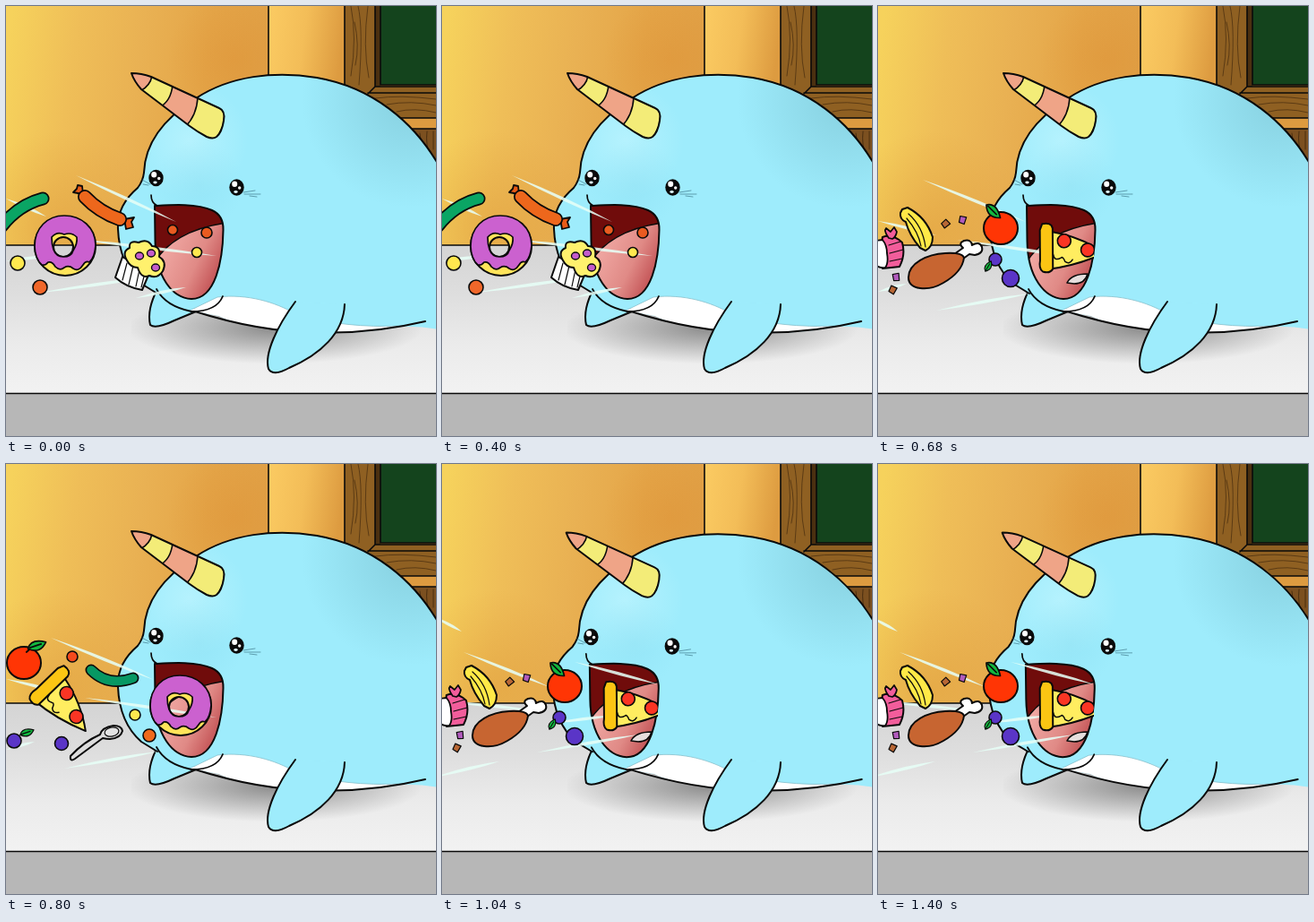
Write an HTML page with a canvas that moves like this. It is 480x480 px and loops after 1440 ms.

```html
<!DOCTYPE html>
<html>
<head>
<meta charset="utf-8">
<style>
html, body { margin: 0; width: 100%; height: 100%; overflow: hidden; }
canvas { display: block; width: 480px; height: 480px; }
</style>
</head>
<body>
<canvas id="stage" width="480" height="480"></canvas>
<script>
const ctx = document.getElementById('stage').getContext('2d');
const INK = '#0a0a0a';
const SKIN = '#9eecfc';
const TICK = 40, TICKS = 36;
ctx.lineCap = ctx.lineJoin = 'round';

function shape(d, fill, width = 2, color = INK) {
  const path = new Path2D(d);
  if (fill) { ctx.fillStyle = fill; ctx.fill(path, 'evenodd'); }
  if (width) { ctx.lineWidth = width; ctx.strokeStyle = color; ctx.stroke(path); }
}
function oval(x, y, rx, ry, fill, width = 1.6, angle = 0) {
  ctx.beginPath();
  ctx.ellipse(x, y, rx, ry, angle, 0, 7);
  ctx.fillStyle = fill;
  ctx.fill();
  if (width) { ctx.lineWidth = width; ctx.strokeStyle = INK; ctx.stroke(); }
}
const ball = (x, y, r, fill) => oval(x, y, r, r, fill);
function blend(x0, y0, x1, y1, ...colors) {
  const g = ctx.createLinearGradient(x0, y0, x1, y1);
  colors.forEach((c, i) => g.addColorStop(i / (colors.length - 1), c));
  return g;
}
function glow(x, y, r, rgb, alpha) {
  const g = ctx.createRadialGradient(x, y, 0, x, y, r);
  g.addColorStop(0, `rgba(${rgb},${alpha})`);
  g.addColorStop(1, `rgba(${rgb},0)`);
  return g;
}
function rect(x, y, w, h, fill) { ctx.fillStyle = fill; ctx.fillRect(x, y, w, h); }
function tube(d, fill, width) {
  shape(d, null, width);
  shape(d, null, width - 3.4, fill);
}
function at(x, y, angle, draw) {
  ctx.save();
  ctx.translate(x, y);
  ctx.rotate(angle);
  draw();
  ctx.restore();
}
function within(d, draw) {
  ctx.save();
  ctx.clip(new Path2D(d));
  draw();
  ctx.restore();
}

function room() {
  rect(0, 0, 294, 267, blend(0, 60, 294, 100, '#f6d25c', '#efbe58', '#e9b153', '#e4a548', '#e0a046'));
  rect(0, 0, 294, 267, glow(60, 250, 110, '218,146,50', .4));
  rect(0, 0, 294, 267, glow(255, 60, 75, '220,140,48', .35));
  rect(293, 0, 87, 130, blend(293, 0, 380, 12, '#fbcb62', '#f3bd58', '#dd9b40'));
  rect(378, 0, 102, 125, '#8f6022');
  rect(412, 0, 6, 90, '#4b3010');
  rect(418, 0, 62, 88, '#14441d');
  shape('M293 0V82M378 0V90M412 0V90L404 98M412 90H480M404 97H480M418 0V88H480', null, 1.6);
  shape('M385 0Q392 35 385 78M393 0Q399 25 394 88M404 0Q398 45 405 80M389 18Q395 44 390 66', null, .8, '#4e3111');
  shape('M412 103Q440 99 480 104M425 110Q452 105 480 111M436 118Q456 113 480 119', null, .8, '#4e3111');
  rect(438, 125, 42, 12, '#dd9b40');
  rect(448, 137, 32, 45, '#7c5020');
  shape('M438 125H480M448 137H480', null, 1.5);
  shape('M462 142L465 164M470 140Q468 155 474 170M477 140V160', null, .8, '#3e260c');
  rect(0, 267, 480, 166, blend(0, 267, 0, 433, '#d4d4d4', '#dedede', '#ebebeb', '#f2f2f2'));
  rect(0, 433, 480, 47, '#b7b7b7');
  shape('M0 267H160M0 432.5H480', null, 1.5);
  ctx.save();
  ctx.scale(1, .24);
  rect(140, 1350, 340, 450, glow(300, 1500, 165, '110,110,110', .75));
  ctx.restore();
}

function eye(x, y) {
  oval(x, y, 8.2, 9.3, INK, 0);
  oval(x - 2.3, y - 3.7, 3, 3.3, '#fff', 0);
  oval(x + 3.2, y + .5, 1.7, 1.8, '#fff', 0);
  oval(x - 1, y + 5, 2.2, 1.4, '#dff8ff', 0);
}

function horn() {
  const outline = 'M140 75Q151 75 162 79L238 114Q245 117 243 128Q241 141 235 146Q231 149 224 146Q213 140 205 134L151 93Q143 84 140 75Z';
  shape(outline, '#efa487', 0);
  within(outline, () => {
    shape('M163 78Q161 89 150 95L171 113Q184 107 186 88Z', '#f3ec78', 1.6);
    shape('M214 102Q213 122 200 135L234 152L250 116Z', '#f3ec78', 1.6);
  });
  shape(outline, null, 2);
}

function mouth() {
  const lips = 'M166 223C184 222 213 220 230 228Q243 234 242.5 250C242 284 234 327 207 327C186 326 167 303 166.5 262Z';
  shape(lips, '#700c0b', 0);
  within(lips, () =>
    shape('M161 295C175 264 204 248 246 242L247 340H160Z', blend(176, 275, 245, 308, '#efa6a1', '#e08a86', '#b94045'), 1.4));
  shape(lips, null, 2);
  shape('M162 211Q162 220 169 223', null, 1.7);
}

function whale(pose) {
  shape('M169 316Q157 339 161 356Q167 361 188 351Q205 344 217 339Z', SKIN);
  ctx.save();
  if (pose) {
    ctx.translate(360, 366);
    ctx.scale(1.006, .9945);
    ctx.translate(-360, -366);
  }
  const back = 'M482 176C455 130 410 91 347 80C300 72 250 78 212 103C174 127 155 155 154 186Q153 195 147 203C134 214 124 229 125 249C126 274 134 295 151 310L169 321';
  const body = back + 'Q190 342 211 341L238 346C252 354 295 364 345 364C390 366 415 363 440 358Q462 357 482 361Z';
  shape(body, SKIN, 0);
  within(body, () => {
    rect(120, 70, 360, 300, glow(205, 150, 65, '196,246,255', .6));
    rect(120, 70, 360, 300, glow(215, 200, 50, '120,208,230', .22));
    rect(120, 70, 360, 300, glow(450, 105, 120, '120,190,205', .6));
    shape('M205 340L236 325C270 321 301 331 322 343C355 355 405 359 438 357L430 370H240Z', '#fff', .7, '#80b8c5');
  });
  shape(back, null);
  shape('M468 352C430 361 390 366 345 364C295 364 252 354 211 341', null);
  shape('M168 316Q178 335 207 341Q235 341 242 324', null, 1.8);
  mouth();
  eye(167.5, 192);
  eye(257.5, 202.5);
  shape('M152 194L161 199M153 199L159 200M265 208L278 206M266 210L284 210M272 212L280 213', null, .7, '#407a8b');
  horn();
  ctx.restore();
  shape('M323 330C303 357 288 388 293 405Q298 414 316 404C351 389 377 365 378 333', SKIN);
}

function leaf(x, y, angle, size = 1) {
  at(x, y, angle, () => {
    ctx.scale(size, size);
    shape('M-9 3Q-6-8 10-4Q4 9-9 3ZM-7 2L5-2', '#12b83f', 1.6);
  });
}
function apple(x, y, leafX, angle) {
  oval(x, y, 19, 18, '#ff3505', 2);
  shape(`M${x + leafX / 5} ${y - 12}L${x + leafX * .6} ${y - 17}`, null, 1.8);
  leaf(x + leafX, y - 19, angle, 1.05);
}
function donut(x, y) {
  at(x, y, 0, () => {
    const hole = 'M9 1A11 11 0 1 1-13 1A11 11 0 1 1 9 1Z';
    shape('M34 0A34 33 0 1 1-34 0A34 33 0 1 1 34 0Z' + hole, '#ffe45a');
    shape('M34-1C34-21 18-34-1-34C-20-34-34-20-34 0C-34 8-31 17-26 21Q-22 22-19 18Q-14 17-11 23Q-6 28-1 24Q4 21 9 25Q15 29 20 21Q23 16 27 18Q33 13 34-1ZM9 5Q14-3 13-10Q7-16-1-13Q-9-17-15-10Q-15-2-13 4Q-10 12-2 12Q7 12 9 5Z', '#cb61cf', 1.7);
  });
}
function pizza(x, y, angle) {
  at(x, y, angle, () => {
    shape('M-17-24L-13 23Q18 17 49 0Q22-16-12-19Z', '#ffed60', 2);
    ball(3, -10, 7.5, '#fa3524');
    ball(30, -2, 7.5, '#fa3524');
    shape('M-8 6Q-6 14 1 9Q3 7 6 13Q11 16 14 10', null, 1.5);
    shape('M-23-27Q-13-30-11-23L-7 22Q-10 28-18 26Q-23 23-22 14L-25-20Z', '#fbc513', 2);
  });
}

function muffin() {
  shape('M130 280L122 303Q134 314 152 317L160 298Z', '#fff', 2);
  shape('M135 287L130 306M142 290L137 311M149 294L145 313M155 298L151 314', null, 1.2);
  shape('M135 284Q129 274 138 270Q137 261 148 264Q158 259 163 268Q173 268 171 280Q180 285 175 296Q169 305 160 301Q151 305 147 292Q139 292 135 284Z', '#fff16d');
  for (const [x, y] of [[149, 279], [162, 276], [167, 292]]) oval(x, y, 4.5, 4, '#c45ccb', 1.4);
}

function firstFoods() {
  tube('M-5 246Q14 222 41 215', '#0aa564', 15);
  donut(66, 268);
  shape('M86 210L75 208L79 204L80 200L85 201Z', '#e95b17', 1.8);
  shape('M132 238L143 236L140 241L142 247L134 249Z', '#e95b17', 1.8);
  tube('M88 213Q104 230 127 238', '#ed671c', 16);
  muffin();
  ball(13, 287, 8, '#ffe84f');
  ball(38, 314, 8, '#f0672a');
  ball(186, 250, 5.5, '#e95b20');
  ball(224, 253, 6, '#e95b20');
  ball(213, 275, 5.5, '#ffe84f');
}

function secondFoods() {
  apple(20, 222, 14, 0);
  pizza(58, 260, .89);
  ball(74, 215, 6, '#f44a1d');
  tube('M95 230Q114 249 142 239', '#079863', 13);
  shape('M105 302Q107 294 120 292Q129 292 130 298Q128 306 116 307Q112 307 108 306L77 329Q71 333 72 326Q87 310 105 302Z', '#dcdcdc');
  oval(118, 299, 8, 5, '#e4e4e4', 1.2, -.2);
  ball(9, 309, 8, '#5a35c7');
  leaf(23, 300, 0, .8);
  ball(62, 312, 7.5, '#5a35c7');
  donut(195, 270);
  ball(144, 280, 6, '#ffe84f');
  ball(160, 303, 7, '#f06a1d');
}

function crumb(x, y, fill, angle) {
  at(x, y, angle, () => shape('M-3-4L4-4L3 4L-3 3Z', fill, 1.2));
}
function thirdFoods() {
  within('M0 0H241V480H0Z', () => pizza(204, 272, .08));
  shape('M211 309Q216 299 234 299Q231 310 219 310Z', '#e6dedd', 1.6);
  apple(137, 248, -9, 1.1);
  ball(131, 283, 7, '#5a35c7');
  ball(148, 304, 9.5, '#5a35c7');
  leaf(123, 291, -.7, .65);
  shape('M27 227L33 225Q54 236 61 258Q61 269 53 273L47 270Q35 256 31 241Q24 238 25 231Z', '#ffe947', 2);
  shape('M34 232Q50 246 53 269M32 237Q45 252 48 268', null, 1.2);
  shape('M85 277L95 270Q89 265 96 262Q104 260 105 267Q113 262 116 269Q118 276 108 278L102 277L91 285Z', '#fff');
  shape('M34 303C34 287 55 277 75 276Q94 275 96 281Q94 297 73 309C56 319 34 317 34 303Z', '#c76531');
  shape('M5 258Q16 254 27 264Q31 278 24 291L5 293Q1 278 5 258Z', '#f25d9b');
  shape('M5 261Q10 267 10 276Q12 287 8 292Q0 293-3 288V262Z', '#fff', 1.8);
  shape('M12 259Q6 251 9 248L14 252L18 247L21 252Q20 258 16 260Z', '#f25d9b', 1.7);
  shape('M12 267L25 263M13 276L28 272M13 285L27 282', null, 1.1);
  crumb(75, 243, '#b86735', .8);
  crumb(94, 239, '#b15bbc', .2);
  crumb(20, 303, '#b15bbc', -.2);
  crumb(16, 317, '#b86735', .4);
}

// Each streak runs from one tip to the other: x0, y0, x1, y1.
const streaks = {
  long: [[78, 189, 190, 241], [0, 215, 45, 235], [74, 260, 235, 279], [0, 285, 48, 279], [38, 320, 160, 303], [145, 326, 201, 314]],
  left: [[50, 194, 165, 241], [0, 240, 65, 256], [88, 261, 235, 283], [0, 319, 32, 310], [65, 340, 170, 321]],
  low: [[-8, 171, 22, 187], [24, 210, 120, 249], [148, 221, 241, 246], [-5, 264, 110, 276], [125, 289, 190, 281], [106, 322, 220, 302], [-10, 350, 64, 332]],
};
function streak([x0, y0, x1, y1]) {
  const length = Math.hypot(x1 - x0, y1 - y0);
  at(x0, y0, Math.atan2(y1 - y0, x1 - x0), () =>
    shape(`M0 0Q${length * .55}-4 ${length} 0Q${length * .55} 3 0 0Z`, 'rgba(231,255,247,.87)', 0));
}

const foods = [firstFoods, secondFoods, thirdFoods];
function draw(now) {
  const tick = Math.floor(now / TICK) % TICKS;
  const pose = Math.floor(.84 * tick + .12) % 2;
  const meal = Math.floor(.66 * tick + .205) % 3;
  room();
  whale(pose);
  const lines = pose ? streaks.low : meal ? streaks.left : streaks.long;
  lines.forEach(streak);
  foods[meal]();
}

const start = performance.now();
function loop() {
  draw(performance.now() - start);
  requestAnimationFrame(loop);
}
loop();
</script>
</body>
</html>
```
